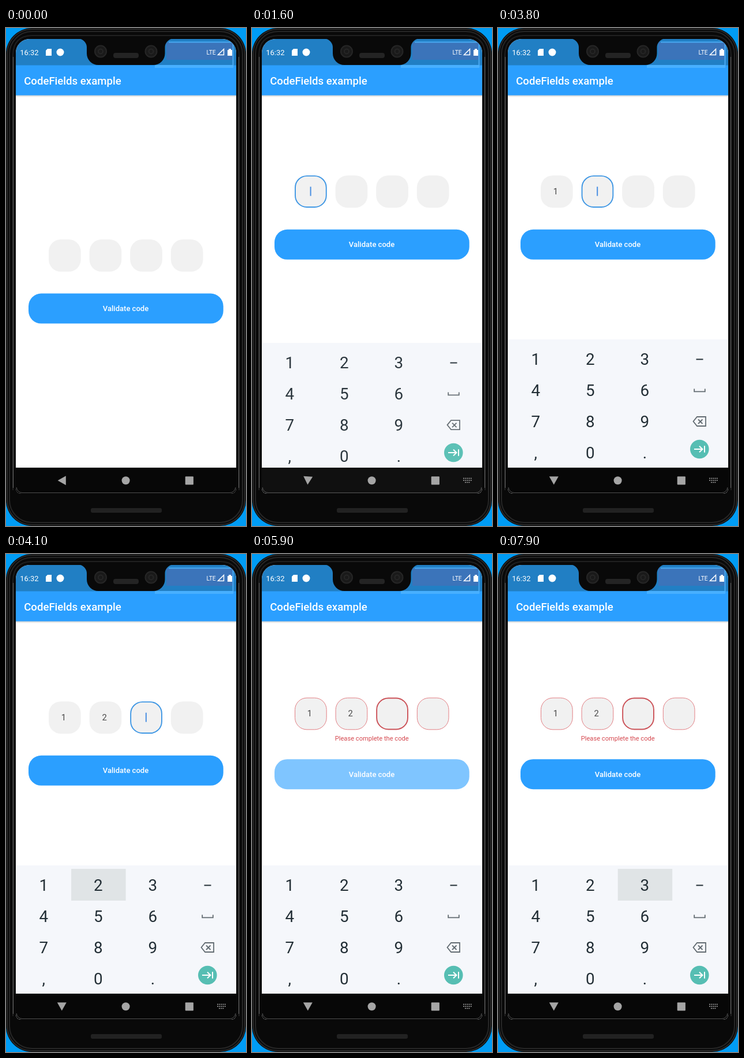
Animation of 416x862 px, one loop 8 s. Source, as an HTML page:

```html
<!DOCTYPE html>
<html lang="en">
<head>
<meta charset="utf-8">
<title>CodeFields example</title>
<style>
  html, body { margin: 0; width: 100%; height: 100%; overflow: hidden; background: #009cf5; }
  svg { display: block; font-family: Roboto, sans-serif; }
  .mid { text-anchor: middle; }
  .medium { font-weight: 500; fill: #fff; }
  .line { fill: none; }
</style>
</head>
<body>
<svg width="416" height="862" viewBox="0 0 416 862">
  <defs>
    <clipPath id="screen"><path d="M17 43A24 24 0 0 1 41 19H375A24 24 0 0 1 399 43V796Q399 806 389 806H27Q17 806 17 796Z"/></clipPath>
    <clipPath id="keyClip"><rect id="keyBox" y="545" width="94.5" height="55"/></clipPath>
    <linearGradient id="shade" x2="0" y2="1">
      <stop stop-color="#000" stop-opacity=".2"/><stop offset="1" stop-color="#000" stop-opacity="0"/>
    </linearGradient>
  </defs>

  <!-- Phone body -->
  <rect width="416" height="862" rx="45" fill="#090909"/>
  <g class="line">
    <rect x="2" y="2" width="412" height="858" rx="43" stroke="#2a2a2a" stroke-width="2"/>
    <rect x="6" y="6" width="404" height="850" rx="39" stroke="#262626" stroke-width="2"/>
    <path d="M12 800V46Q13 14 44 13H372Q403 14 404 46V800" stroke="#202020" stroke-width="2"/>
    <path d="M12.5 50V796M403.5 50V796" stroke="#686868"/>
  </g>
  <rect x="147" y="831" width="123" height="8" rx="3" fill="#222"/>

  <g clip-path="url(#screen)">
    <rect x="17" y="19" width="382" height="787" fill="#fff"/>
    <rect x="17" y="116" width="382" height="4" fill="url(#shade)"/>
    <rect x="17" y="64" width="382" height="52.5" fill="#2b9fff"/>
    <rect x="17" y="19" width="382" height="45.5" fill="#217fc4"/>
    <rect x="278" y="25" width="115" height="30" fill="#3b74ba"/>
    <path class="line" d="M282 24.5H392M393.5 26V68" stroke="#49a9f2" stroke-width="2"/>
    <rect x="258" y="64" width="136" height="5" fill="#48b0ff"/>
    <text class="medium" x="31.2" y="97.5" font-size="18.6">CodeFields example</text>

    <g fill="#fff">
      <text x="24.2" y="46.7" font-size="13">16:32</text>
      <path d="M72 36H79V48H69V39Z"/>
      <circle cx="94" cy="42" r="6.5"/>
      <text x="347.5" y="45.5" font-size="10.3">LTE</text>
      <path class="line" d="M367.5 46.5H377.5V36.5Z" stroke="#fff" stroke-width="1.5"/>
      <path d="M384 38H386V36H390V38H392V48H384Z"/>
    </g>

    <g id="fields"></g>
    <text id="error" class="mid" x="207.7" y="322.7" font-size="11.14" fill="#d5484f">Please complete the code</text>
    <g id="button">
      <rect x="39" width="337.7" height="52" rx="22" fill="#2b9fff"/>
      <text class="medium mid" x="207.5" y="30.5" font-size="13">Validate code</text>
    </g>

    <g id="keyboard">
      <rect x="17" y="539" width="382" height="267" fill="#f5f7fb"/>
      <circle id="ripple" cy="572.5" fill="#e0e4e6" clip-path="url(#keyClip)"/>
      <g id="keys" class="mid" font-size="27.8" fill="#222e35"></g>
      <g class="line" stroke="#626b71" stroke-width="1.8">
        <path d="M343.5 573.5H355.5" stroke="#222e35" stroke-width="2"/>
        <path d="M340.2 624.5V629.3H358.8V624.5"/>
        <path d="M345 673H360V689H345L338.5 681ZM347 677.5L354.5 685M354.5 677.5L347 685"/>
      </g>
      <circle cx="349.3" cy="729" r="16.3" fill="#56beb3"/>
      <path class="line" d="M340 729H354M349 723.7L354.5 729L349 734.3M358 723.2V734.7" stroke="#fff" stroke-width="2"/>
    </g>

    <g id="nav">
      <rect x="17" y="761" width="382" height="45" fill="#070707"/>
      <path class="line" d="M18 795Q20 804 28 804.5H388Q396 804 398 795" stroke="#505050"/>
    </g>
    <g fill="#a5a5a5">
      <path id="back" d="M-7.2 0L7 -8V8Z"/>
      <circle cx="207.6" cy="783.3" r="7"/>
      <rect x="310.7" y="776.2" width="14.2" height="14.2" rx="1"/>
      <path id="imeIcon" class="line" d="M366 779.5H381M366 783H381M369 786.5H378" stroke="#a5a5a5" stroke-width="1.5" stroke-dasharray="2 1.2"/>
    </g>
  </g>

  <!-- Notch -->
  <path d="M125 18.5A15 15 0 0 1 140 33.5V44A20 20 0 0 0 160 64H255.5A20 20 0 0 0 275.5 44V33.5A15 15 0 0 1 290.5 18.5Z" fill="#090909"/>
  <g fill="#1a1a1a" stroke="#262626" stroke-width="2">
    <circle cx="164" cy="40.5" r="10"/><circle cx="251.5" cy="40.5" r="10"/>
    <circle cx="164" cy="40.5" r="4"/><circle cx="251.5" cy="40.5" r="4"/>
  </g>
  <rect x="186" y="43" width="44" height="9" rx="4" fill="#242424"/>
</svg>
<script>
  const LOOP = 8000;
  const $ = id => document.getElementById(id);
  const set = (el, attrs) => { for (const k in attrs) el.setAttribute(k, attrs[k]); };
  const add = (parent, tag, attrs, text = '') => {
    const el = document.createElementNS('http://www.w3.org/2000/svg', tag);
    set(el, attrs);
    el.textContent = text;
    return parent.appendChild(el);
  };

  ['123', '456', '789', ',0.'].forEach((row, r) => [...row].forEach((key, c) =>
    add($('keys'), 'text', { x: 65.2 + 94.6 * c, y: 583 + 54 * r }, key)));

  const fields = [0, 1, 2, 3].map(i => {
    const x = 74 + 70.6 * i;
    return {
      box: add($('fields'), 'rect', { fill: '#f1f1f1' }),
      digit: add($('fields'), 'text', { class: 'mid', x: x + 26, y: 32.7, 'font-size': 14.85, fill: '#484848' }, i + 1),
      cursor: add($('fields'), 'rect', { x: x + 26.6, y: 19.5, width: 2, height: 16, fill: '#4a90e2' }),
      x
    };
  });

  const typedAt = [2800, 4000];
  const focusAt = [1300, ...typedAt];
  const presses = [[0, 2700], [1, 3900], [2, 7800]];

  function draw(t) {
    const open = t >= 1400, lifted = t >= 1600, failed = t >= 5900;
    const focus = open ? focusAt.filter(s => t >= s).length - 1 : -1;
    const blinkOn = open && Math.floor((t - focusAt[focus]) / 500) % 2 === 0;

    // Keyboard slides and fades in
    const rest = open && t < 1800 ? Math.exp((1400 - t) / 80) : 0;
    set($('keyboard'), { transform: `translate(0 ${74 * rest})`, opacity: open ? 1 - 0.55 * rest : 0 });
    set($('nav'), { opacity: 1 - 0.5 * rest });
    set($('back'), { transform: `translate(96.8 783.3) rotate(${open ? -90 + 40 * rest : 0})` });
    set($('imeIcon'), { opacity: open ? 1 : 0 });

    // Code fields
    set($('fields'), { transform: `translate(0 ${failed ? 248.6 : lifted ? 255.2 : 366})` });
    fields.forEach(({ box, digit, cursor, x }, i) => {
      const focused = i === focus && t >= 1500;
      const w = focused ? 1.9 : failed ? 1 : 0;
      set(box, {
        x: x + w / 2, y: w / 2, width: 55.7 - w, height: 55.8 - w, rx: 21 - w / 2,
        stroke: !failed ? '#3f97e4' : focused ? '#cb5157' : '#e27e83', 'stroke-width': w
      });
      set(digit, { opacity: t >= typedAt[i] ? 1 : 0 });
      set(cursor, { opacity: i === focus && blinkOn ? 1 : 0 });
    });

    // Submit button and message
    const dim = t < 5800 ? 0 : t < 5900 ? 0.25 : Math.max(0, 0.4 * (1 - (t - 5900) / 300));
    set($('button'), { transform: `translate(0 ${failed ? 355.2 : lifted ? 348.8 : 459.6})`, opacity: 1 - dim });
    set($('error'), { opacity: failed ? 1 : 0 });

    // Key press ripple
    const [key, start] = presses.filter(p => t >= p[1]).pop() || [0, LOOP];
    const age = t - start;
    set($('keyBox'), { x: 18.5 + 94.6 * key });
    set($('ripple'), {
      cx: 65.8 + 94.6 * key, r: Math.max(0, 49 + age / 10),
      opacity: age < 0 ? 0 : Math.min(1, Math.max(0, 1 - (age - 200) / 200))
    });
  }

  const begin = performance.now();
  function tick() {
    const t = (performance.now() - begin) % LOOP;
    draw(Math.floor(t / 100) * 100);
    requestAnimationFrame(tick);
  }
  tick();
</script>
</body>
</html>
```
